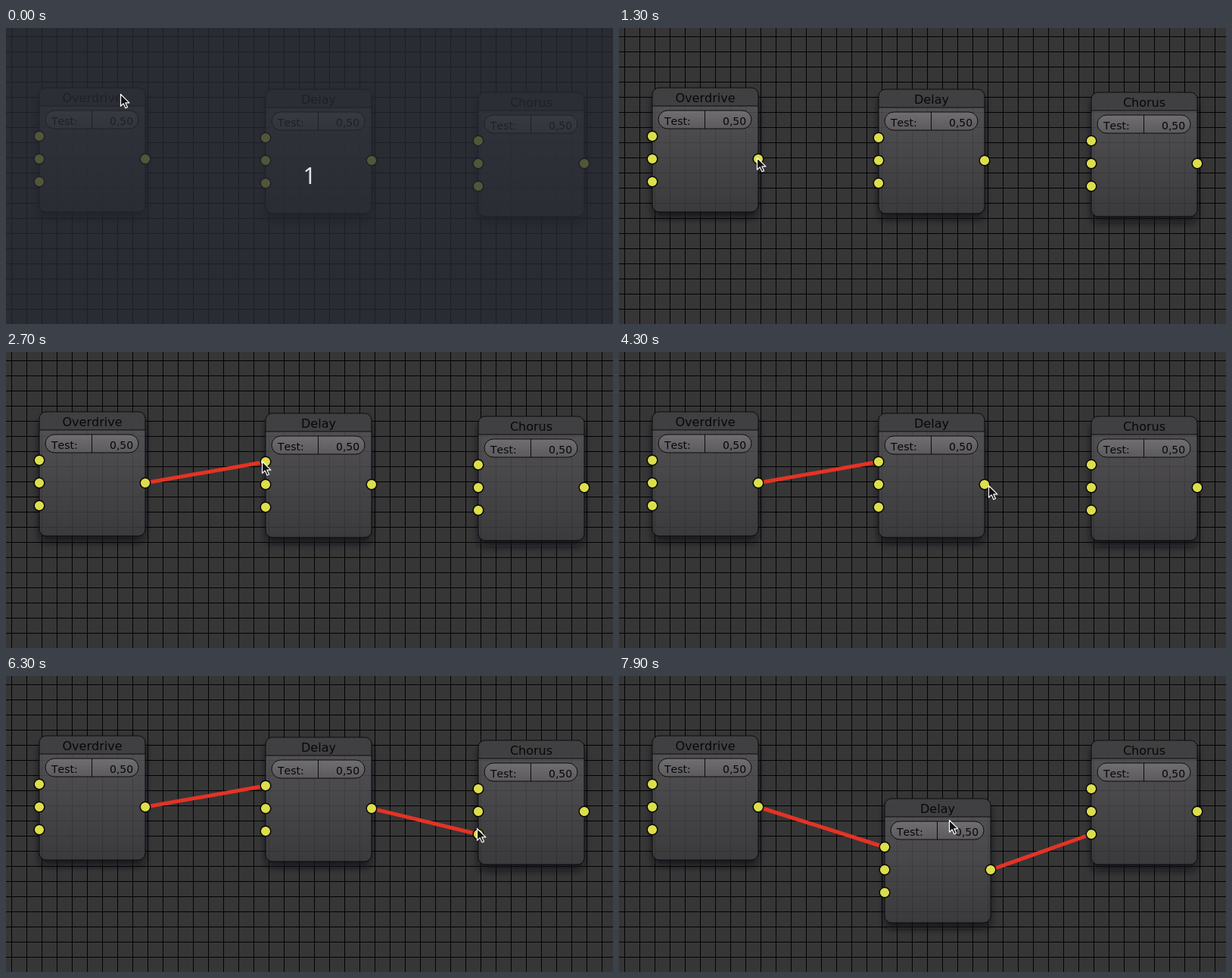
Recreate the animation shown at these times as an HTML page. Size 802x391 px, loop 8 s.

```html
<!DOCTYPE html>
<html lang="en">
<head>
<meta charset="utf-8">
<title>Node editor</title>
<style>
  html, body { margin: 0; width: 100%; height: 100%; overflow: hidden; background: #363636; }
  svg { display: block; width: 802px; height: 391px; }
  text { font: 14px "DejaVu Sans", sans-serif; font-kerning: none; fill: #080808; }
  .title { font-size: 16px; text-anchor: middle; }
  .wire { stroke: #e43325; stroke-width: 5; }
  .port { fill: #dcdf4b; stroke: #080808; stroke-width: 1.5; }
  .edge { fill: none; stroke: #0c0c0c; }
  .count { font: 30px "Noto Sans", sans-serif; fill: #e4e5e6; text-anchor: middle; }
</style>
</head>
<body>
<svg viewBox="0 0 802 391">
  <defs>
    <pattern id="grid" x="7" y="11" width="20" height="20" patternUnits="userSpaceOnUse">
      <path d="M0 0H20V1H1V20H0Z" fill="#020202"/>
    </pattern>
    <linearGradient id="body" x2="0" y2="1">
      <stop stop-color="#5c5a5d"/><stop offset="1" stop-color="#3c3b3d"/>
    </linearGradient>
    <linearGradient id="field" x2="0" y2="1">
      <stop stop-color="#706e71"/><stop offset="1" stop-color="#5c5a5d"/>
    </linearGradient>
    <filter id="shadow" x="-20%" y="-20%" width="140%" height="140%">
      <feGaussianBlur stdDeviation="5"/>
      <feOffset dy="8"/>
      <feComposite operator="out" in2="SourceAlpha"/>
    </filter>
  </defs>
  <rect width="802" height="391" fill="#363636"/>
  <rect width="802" height="391" fill="url(#grid)"/>
  <line class="wire"/>
  <line class="wire"/>
  <g id="nodes"></g>
  <g id="cover">
    <rect width="802" height="391" fill="#242832" fill-opacity=".75"/>
    <text class="count" x="401" y="206">1</text>
  </g>
  <path id="cursor" d="M.5 .5V16.2L4.2 12.8 6.9 18.8 9.5 17.6 6.9 11.9H11.9Z"
        fill="#111" stroke="#fff" stroke-width="1.2" stroke-linejoin="round"/>
</svg>
<script>
const $ = id => document.getElementById(id);
const wires = document.querySelectorAll('.wire');
const PERIOD = 8000, STEP = 100;
const input = (node, i) => [node.x, node.y + 64 + 30 * i];
const output = node => [node.x + 140, node.y + 94];

function addNode(name, x, y) {
  const origin = { x: 0, y: 0 };
  const ports = [0, 1, 2].map(i => input(origin, i)).concat([output(origin)])
    .map(([cx, cy]) => `<circle class="port" cx="${cx}" cy="${cy}" r="6.8"/>`).join('');
  $('nodes').insertAdjacentHTML('beforeend', `<g>
    <rect width="140" height="164" rx="9" fill="#100d12" opacity=".7" filter="url(#shadow)"/>
    <rect width="140" height="164" rx="9" fill="url(#body)" fill-opacity=".8"/>
    <path d="M0 24V9A9 9 0 0 1 9 0H131A9 9 0 0 1 140 9V24Z" fill="#3e3c3f" fill-opacity=".85"/>
    <path class="edge" d="M0 24H140"/>
    <rect class="edge" width="140" height="164" rx="9"/>
    <rect x="8" y="30" width="123" height="24" rx="12" fill="url(#field)" stroke="#0c0c0c"/>
    <path class="edge" d="M69.5 30V54"/>
    <text class="title" x="70" y="18.5">${name}</text>
    <text x="16" y="49">Test:</text>
    <text x="93" y="49">0,50</text>
    ${ports}</g>`);
  const node = { el: $('nodes').lastElementChild };
  place(node, x, y);
  return node;
}

function place(node, x, y) {
  Object.assign(node, { x, y });
  node.el.setAttribute('transform', `translate(${x} ${y})`);
}

// Eases out; s > 0 overshoots before settling
function ease(t, start, end, s = 0) {
  const u = Math.min(1, Math.max(0, (t - start) / (end - start))) - 1;
  return 1 + (s + 1) * u ** 3 + s * u ** 2;
}

// Pointer moves: start, end, x, y, overshoot
const HOME = [151, 87];
const MOVES = [
  [700, 1000, 182, 171],
  [1600, 2500, 338, 144],
  [3300, 4300, 488, 176, 2.2],
  [4800, 5700, 624, 207, 2.2],
  [5900, 6300, 622, 201],
  [6700, 7000, 428, 98],
  [7700, 7900, 436, 190]
];

function pointerAt(t) {
  let [x, y] = HOME;
  for (const [start, end, toX, toY, s] of MOVES) {
    const e = ease(t, start, end, s);
    x += (toX - x) * e;
    y += (toY - y) * e;
  }
  return [x, y];
}

function drawWire(el, shown, [x1, y1], [x2, y2]) {
  el.style.display = shown ? '' : 'none';
  for (const [k, v] of Object.entries({ x1, y1, x2, y2 })) el.setAttribute(k, v);
}

const overdrive = addNode('Overdrive', 44, 79);
const delay = addNode('Delay', 343, 81);
const chorus = addNode('Chorus', 624, 85);

function draw(now) {
  const t = Math.floor(now % PERIOD / STEP) * STEP;
  const tip = pointerAt(t);
  const drag = ease(t, 7700, 7900);
  place(delay, 343 + 8 * drag, 81 + 81 * drag);
  drawWire(wires[0], t >= 1700, output(overdrive), t < 2700 ? tip : input(delay, 0));
  drawWire(wires[1], t >= 4700, output(delay), t < 6300 ? tip : input(chorus, 2));
  $('cursor').setAttribute('transform', `translate(${tip})`);
  $('cover').style.display = t < STEP ? '' : 'none';
}

let start;
function tick(now) {
  start ??= now;
  draw(now - start);
  requestAnimationFrame(tick);
}
draw(0);
requestAnimationFrame(tick);
</script>
</body>
</html>
```
